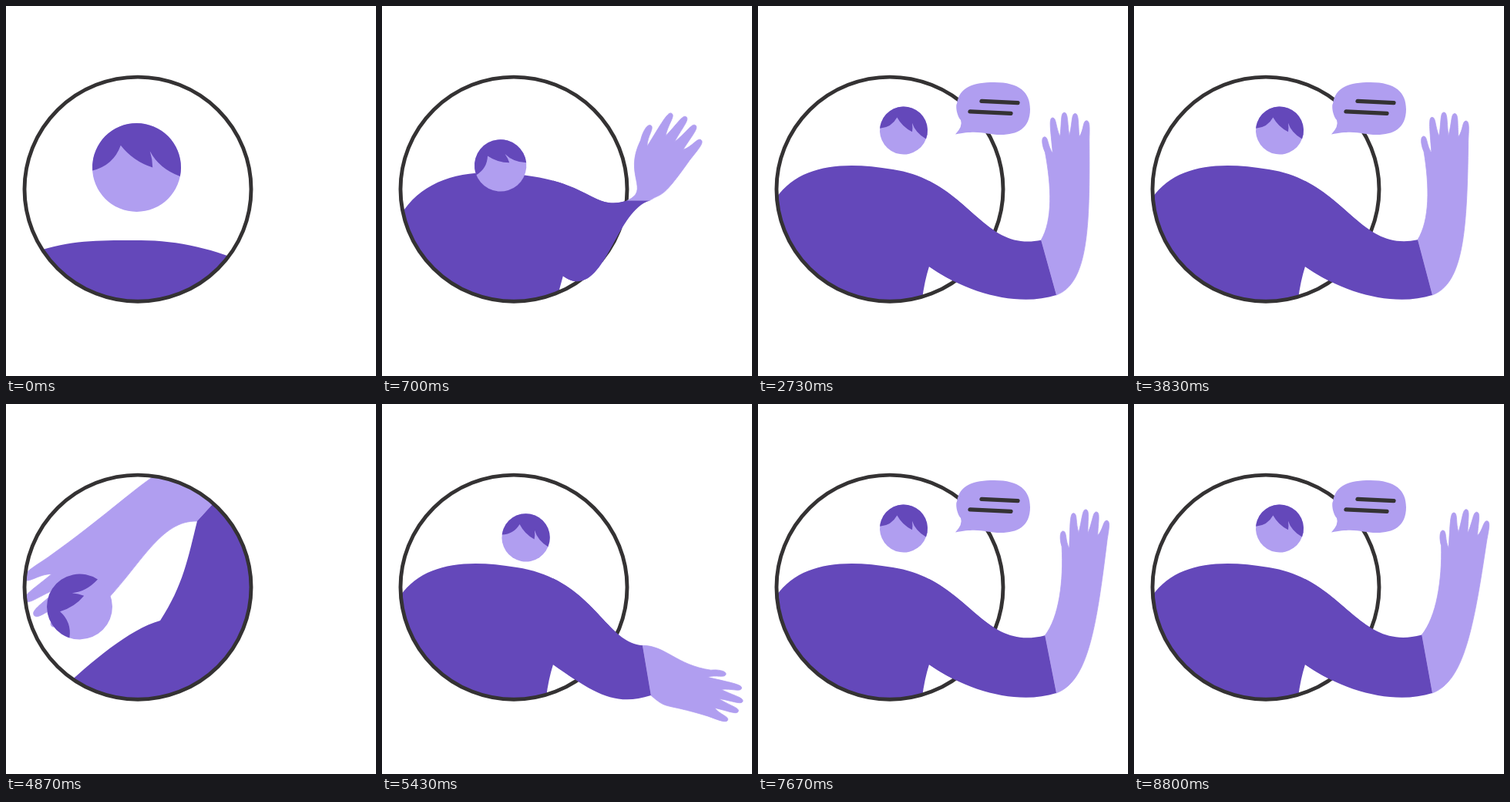
An HTML page with a canvas that plays this animation: 480 px wide and 480 px high, repeating every 9.03 s.

```html
<!DOCTYPE html>
<html lang="en">
<head>
<meta charset="utf-8">
<title>Waving hello</title>
<style>
html, body { margin: 0; width: 100%; height: 100%; overflow: hidden; background: #fff; }
canvas { display: block; width: 480px; height: 480px; }
</style>
</head>
<body>
<canvas id="stage"></canvas>
<script>
const DARK = '#6448ba', LIGHT = '#b09ef0', INK = '#343233';
const LOOP = 9030, HALF = 4530, OPEN = 430;
const RAD = Math.PI / 180;

const canvas = document.getElementById('stage');
const dpr = window.devicePixelRatio || 1;
canvas.width = canvas.height = 480 * dpr;
const g = canvas.getContext('2d');

const clamp = v => Math.max(0, Math.min(1, v));
const mix = (a, b, u) => a + (b - a) * u;
const ease = (t, from, span) => {
  const u = clamp((t - from) / span);
  return u * u * (3 - 2 * u);
};
const easeBack = (t, from, span) => {
  const v = clamp((t - from) / span) - 1;
  return 1 + 3 * v ** 3 + 2 * v * v;
};

// Arm pose: inner elbow, outer elbow, shoulder handle, palm, turn, size, elbow handle.
// While waving, everything follows from the turn of the hand.
const wave = turn => [
  366.5 + 0.68 * turn, 304.3 - 0.48 * turn, 387, 375, 290, 319 + 0.3 * turn,
  396.5 + 2.8 * turn, 194.5 - 0.2 * turn, turn, 1, 41, -15
];
const swing = [
  [1190, 20], [1400, -22], [1740, -10], [2040, 10], [2440, -10],
  [2730, 1], [3050, 10], [3140, 8.5], [3560, -10], [4030, 10]
];
const armKeys = [
  [0, 335, 345, 345, 425, 285, 318, 420, 330, -60, 1.5, 40, -15],
  [340, 248, 152, 320, 73, 236, 200, 107, 221, -124, 1.58, -115, -21],
  [560, 300, 205, 345, 160, 262, 235, 300, 122, -25, 1.3, 10, -25],
  [960, 345, 318, 350, 388, 290, 316, 425, 385, 115, 1, 25, 22],
  ...swing.map(([t, turn]) => [t, ...wave(turn)])
];
// Torso: left end, two handles, shoulder, handle, armpit
const torsoKeys = [
  [0, 30, 322, 80, 303, 120, 304, 170, 304, 225, 303, 300, 440],
  [340, 70, 372, 110, 335, 160, 292, 200, 281, 230, 235, 330, 440],
  [800, 18, 258, 46, 207, 105, 200, 175, 212, 274, 227, 222, 338]
];
// Head: x, y, radius, turn
const headKeys = [
  [0, 169.5, 209.5, 57.5, 0],
  [340, 95.5, 263, 42.5, -68],
  [960, 189, 170, 31, 13],
  [1740, 189, 161.5, 31, 9]
];

// Smooth interpolation without overshoot: extremes get zero slope
function sample(keys, t) {
  const last = keys.length - 1;
  if (t >= keys[last][0]) return keys[last].slice(1);
  let i = 0;
  while (t >= keys[i + 1][0]) i++;
  const rate = (k, c) => (keys[k + 1][c] - keys[k][c]) / (keys[k + 1][0] - keys[k][0]);
  const slope = (k, c) => {
    if (k === 0 || k === last) return 0;
    const a = rate(k - 1, c), b = rate(k, c);
    return a * b <= 0 ? 0 : 2 * a * b / (a + b);
  };
  const [a, b] = [keys[i], keys[i + 1]];
  const h = b[0] - a[0], u = (t - a[0]) / h, v = 1 - u;
  return a.slice(1).map((from, n) => {
    const c = n + 1;
    return v * v * (1 + 2 * u) * from + u * u * (3 - 2 * u) * b[c]
      + h * u * v * (v * slope(i, c) - u * slope(i + 1, c));
  });
}

function drawForearm([ex, ey, ox, oy, , , px, py, turn, size, hx, hy]) {
  const cos = Math.cos(turn * RAD) * size, sin = Math.sin(turn * RAD) * size;
  const at = (x, y) => [px + x * cos - y * sin, py + x * sin + y * cos];
  const bend = Math.min(90, 30 + 0.95 * turn) * RAD;
  const reach = Math.min(1, Math.hypot(px - ox, py - oy) / 150);
  // Each finger: tip, then the notch after it
  const fingers = [
    [-28, -24, -17, -3], [-18, -49, -8, -25], [-3, -56, 4, -26],
    [11, -55, 17, -25], [26, -46, 30, -20]
  ];
  g.beginPath();
  g.moveTo(ex, ey);
  g.bezierCurveTo(ex + 30 * size * Math.sin(bend), ey - 30 * size * Math.cos(bend),
    ...at(-18, 40), ...at(-27, -4));
  for (const [x, y, nx, ny] of fingers) {
    g.bezierCurveTo(...at(x - 3, y + 12), ...at(x - 5, y), ...at(x, y));
    g.bezierCurveTo(...at(x + 5, y), ...at(x + 4, y + 12), ...at(nx, ny));
  }
  g.bezierCurveTo(...at(33, 95 * reach), ox + hx, oy + hy, ox, oy);
  g.closePath();
  g.fillStyle = g.strokeStyle = LIGHT;
  g.lineWidth = 0.8;
  g.lineJoin = 'round';
  g.fill();
  g.stroke();
}

function drawTorso([sx, sy, ax, ay, bx, by, px, py, cx, cy, nx, ny], arm, inside) {
  const [ex, ey, ox, oy, dx, dy] = arm;
  g.beginPath();
  g.moveTo(sx, sy);
  g.bezierCurveTo(ax, ay, bx, by, px, py);
  g.bezierCurveTo(cx, cy, dx, dy, ex, ey);
  g.lineTo(ox, oy);
  g.bezierCurveTo(ox - 47, oy + 15, nx + 53, ny + 37, nx, ny);
  if (inside) {
    g.quadraticCurveTo(nx - 6, ny + 19, nx - 9, ny + 42);
    g.lineTo(nx - 9, 500);
    g.lineTo(0, 500);
  }
  g.closePath();
  g.fillStyle = DARK;
  g.fill();
}

function drawHead([x, y, r, turn]) {
  g.save();
  g.translate(x, y);
  g.rotate(turn * RAD);
  g.scale(r, r);
  g.beginPath();
  g.arc(0, 0, 1, 0, 7);
  g.fillStyle = LIGHT;
  g.fill();
  g.beginPath();
  g.moveTo(-0.997, 0.07);
  g.quadraticCurveTo(-0.52, -0.05, -0.36, -0.5);
  g.quadraticCurveTo(-0.08, -0.14, 0.36, 0);
  g.quadraticCurveTo(0.36, -0.18, 0.3, -0.37);
  g.quadraticCurveTo(0.5, 0.02, 0.98, 0.2);
  g.arc(0, 0, 1, 0.2, Math.PI - 0.07, true);
  g.fillStyle = DARK;
  g.fill();
  g.restore();
}

function drawBubble(t) {
  const size = easeBack(t, 1060, 330);
  if (size <= 0) return;
  const settle = ease(t, 1740, 180), grow = ease(t, 1355, 385);
  const right = mix(364, 353, settle), top = mix(92, 99, settle);
  const mid = (right + 260) / 2, side = top + 35;
  g.save();
  g.translate(256, 166);
  g.scale(size, size);
  g.translate(-256, -166);
  g.beginPath();
  g.moveTo(256, 166.5);
  g.quadraticCurveTo(266, 156, 263, 148);
  g.bezierCurveTo(256, 139, 257, 126, 258, top + 28);
  g.bezierCurveTo(261, top + 6, mid - 27, top, mid, top);
  g.bezierCurveTo(mid + 33, top, right, top + 13, right, side);
  g.bezierCurveTo(right, side + 25, right - 17, 167, right - 38, 167);
  g.bezierCurveTo(right - 58, 167, 288, 160, 256, 166.5);
  g.fillStyle = LIGHT;
  g.fill();
  g.restore();

  if (!grow) return;
  const line = (x, y, length) => {
    g.moveTo(x, y);
    g.lineTo(x + length * grow, y + length * grow * 0.05);
  };
  g.strokeStyle = INK;
  g.lineWidth = 5.3;
  g.lineCap = 'round';
  g.beginPath();
  line(mix(294, 290, settle), mix(118.5, 123.3, settle), mix(58, 47, settle));
  line(mix(277, 275, settle), mix(133.3, 136.8, settle), mix(44, 53, settle));
  g.stroke();
}

function ringPath() {
  g.beginPath();
  g.ellipse(171, 237.7, 147, 145.6, 0, 0, 2 * Math.PI);
}

function draw(t) {
  const arm = sample(armKeys, t), torso = sample(torsoKeys, t);
  g.setTransform(dpr, 0, 0, dpr, 0, 0);
  g.fillStyle = '#fff';
  g.fillRect(0, 0, 480, 480);

  g.save();
  ringPath();
  g.clip();
  drawForearm(arm);
  drawTorso(torso, arm, true);
  g.restore();

  ringPath();
  g.strokeStyle = INK;
  g.lineWidth = 4.9;
  g.stroke();

  // Once the arm swings out it passes in front of the ring
  if (t >= OPEN) {
    g.save();
    g.beginPath();
    g.rect(222, 0, 258, 480);
    g.clip();
    drawForearm(arm);
    drawTorso(torso, arm, false);
    g.restore();
  }
  drawHead(sample(headKeys, t));
  drawBubble(t);
}

const start = performance.now();
function tick() {
  const t = (performance.now() - start) % LOOP;
  draw(t < HALF ? t : t - HALF);
  requestAnimationFrame(tick);
}
tick();
</script>
</body>
</html>
```
